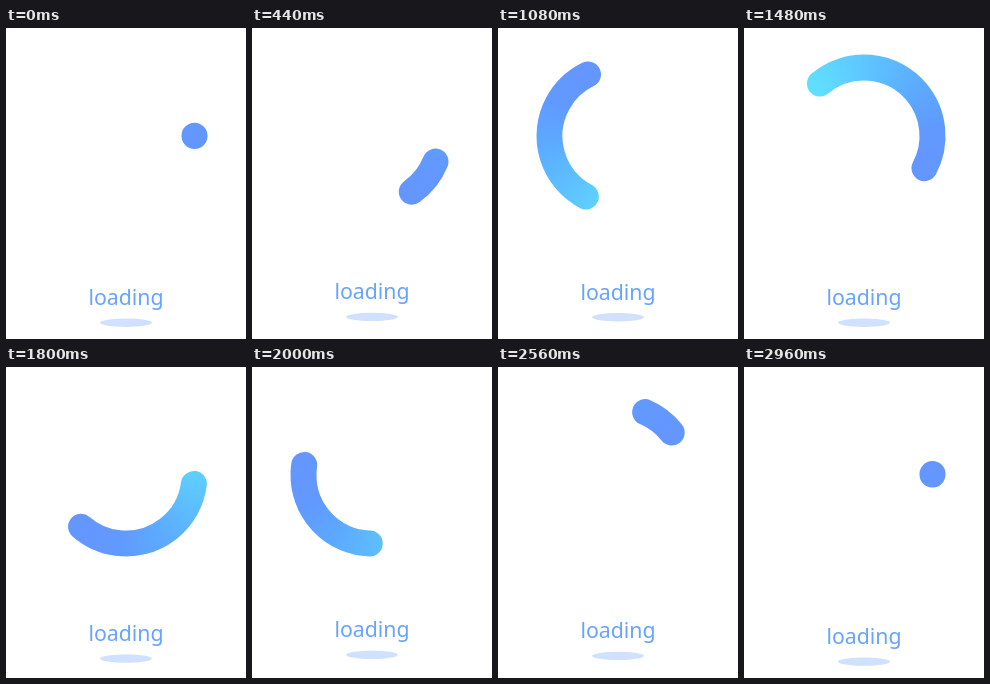
An HTML page with a canvas for the animation above (3 s loop, 240 by 311 pixels).

```html
<!DOCTYPE html>
<html lang="en">
<head>
<meta charset="utf-8">
<title>Loading</title>
<style>
  html, body { margin: 0; width: 100%; height: 100%; overflow: hidden; background: #fff; }
  canvas, svg { position: absolute; left: 0; top: 0; width: 240px; height: 311px; }
  text { font: 21.3px "Noto Sans", "Open Sans", sans-serif; fill: #68a4fc; text-anchor: middle; }
  ellipse { fill: #cfe1ff; }
</style>
</head>
<body>
<canvas id="ring"></canvas>
<svg viewBox="0 0 240 311">
  <g id="label">
    <text x="120" y="277">loading</text>
    <ellipse cx="120" cy="294.7" rx="26" ry="4.2"/>
  </g>
</svg>
<script>
const LOOP = 3000, STEP = 40, BOB = 1500;
const CX = 120, CY = 108, RADIUS = 68.5, WIDTH = 26;
const RAD = Math.PI / 180;

// [ms, degrees clockwise from the right]
const HEAD = [[0, 0], [440, 54.5], [760, 139], [1080, 244], [1480, 388],
  [1800, 491], [2200, 601], [2600, 688], [3000, 720]];
const TAIL = [[0, 0], [440, 22], [760, 59], [1080, 118], [1480, 230],
  [1800, 367.5], [2200, 531.6], [2600, 665], [2800, 703], [3000, 720]];

// Colour by angular distance behind the head
const SHADES = [[170, '#60e0ff'], [155, '#60dbff'], [125, '#5ecaff'],
  [70, '#5caaff'], [35, '#6199ff'], [0, '#6496ff']];
const SPAN = 200;

const canvas = document.getElementById('ring');
const label = document.getElementById('label');
const ctx = canvas.getContext('2d');
const dpr = window.devicePixelRatio || 1;
canvas.width = 240 * dpr;
canvas.height = 311 * dpr;
ctx.scale(dpr, dpr);
ctx.lineWidth = WIDTH;
ctx.lineCap = 'round';

// Slope at a key, flat at both ends
function slope(keys, i) {
  if (i === 0 || i === keys.length - 1) return 0;
  const [a, b] = [keys[i - 1], keys[i + 1]];
  return (b[1] - a[1]) / (b[0] - a[0]);
}

// Smooth cubic curve through the keys
function curve(keys, t) {
  let i = 0;
  while (i < keys.length - 2 && t >= keys[i + 1][0]) i++;
  const [t0, a] = keys[i], [t1, b] = keys[i + 1];
  const d = t1 - t0, u = (t - t0) / d, v = 1 - u;
  return a * v * v * (1 + 2 * u) + b * u * u * (3 - 2 * u)
    + d * u * v * (slope(keys, i) * v - slope(keys, i + 1) * u);
}

function drawArc(t) {
  const head = curve(HEAD, t);
  const tail = Math.min(curve(TAIL, t), head - 0.2);
  const paint = ctx.createConicGradient((head - SPAN) * RAD, CX, CY);
  for (const [behind, color] of SHADES) paint.addColorStop((SPAN - behind) / 360, color);
  ctx.clearRect(0, 0, 240, 311);
  ctx.strokeStyle = paint;
  ctx.beginPath();
  ctx.arc(CX, CY, RADIUS, tail * RAD, head * RAD);
  ctx.stroke();
}

function bob(t) {
  const lift = 9.2 * (1 - Math.cos(2 * Math.PI * t / BOB)) / 2;
  label.setAttribute('transform', `translate(0 ${-lift.toFixed(2)})`);
}

const start = performance.now();
function tick() {
  const now = (performance.now() - start) % LOOP;
  const t = Math.floor(now / STEP) * STEP;
  drawArc(t);
  bob(t);
  requestAnimationFrame(tick);
}
tick();
</script>
</body>
</html>
```
